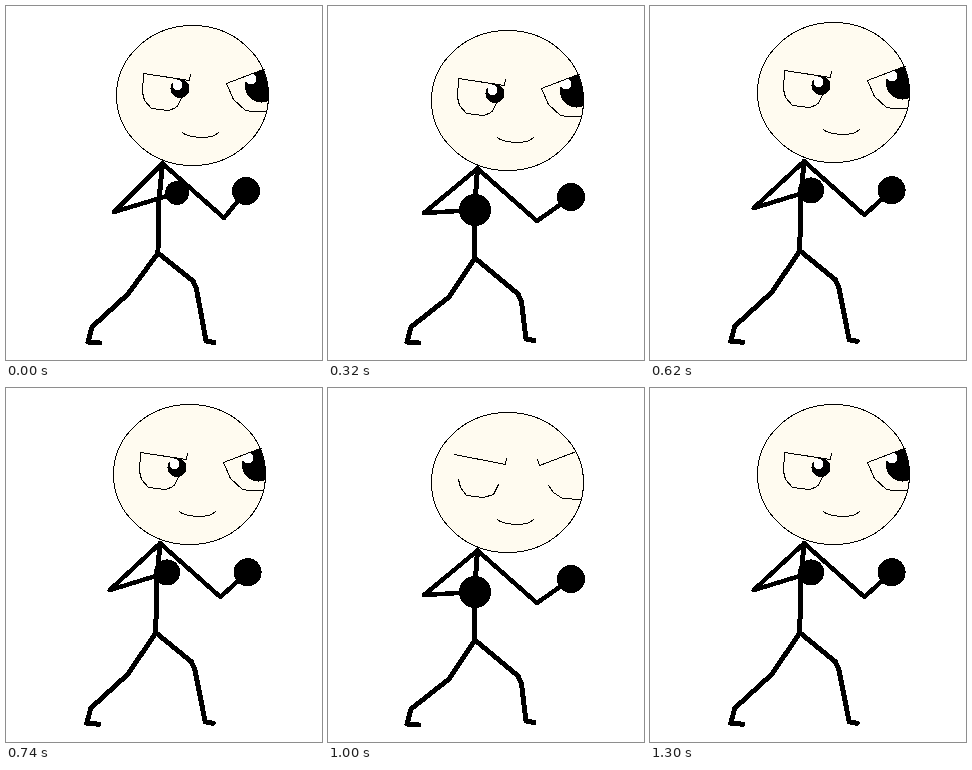
Write an HTML page that moves like this. It is 316x354 px and loops after 1360 ms.

```html
<!DOCTYPE html>
<html lang="en">
<head>
<meta charset="utf-8">
<title>Fighting stance</title>
<style>
  html, body { margin: 0; width: 100%; height: 100%; overflow: hidden; background: #fff; }
  svg { display: block; width: 316px; height: 354px; shape-rendering: crispEdges; }
  .line { fill: none; stroke: #000; stroke-width: 1; }
  .limb { fill: none; stroke: #000; stroke-width: 5; stroke-linecap: round; stroke-linejoin: round; }
  .arm { stroke-width: 4.5; }
  .skin { fill: #fffbf0; }
  .shine { fill: #fff; }
</style>
</head>
<body>
<svg viewBox="0 0 316 354">
  <defs>
    <clipPath id="leftLid"><path d="M27 48L74 55V90H20Z"/></clipPath>
    <clipPath id="rightLid"><path d="M110 58L148 43.5L160 50V95H110Z"/></clipPath>
    <clipPath id="skull"><ellipse cx="76" cy="70" rx="76" ry="70"/></clipPath>
  </defs>
  <g id="head">
    <ellipse class="line skin" cx="76.5" cy="70.5" rx="76" ry="70"/>
    <g transform="translate(.5 .5)">
      <path class="line" d="M66 107Q69 111 84 112Q98 112 102 107"/>
      <g id="open">
        <g clip-path="url(#leftLid)">
          <circle cx="63.5" cy="63" r="9.5"/>
          <circle class="shine" cx="61" cy="59.5" r="5"/>
        </g>
        <g clip-path="url(#skull)">
          <g clip-path="url(#rightLid)">
            <circle cx="145" cy="60.5" r="16.5"/>
            <circle class="shine" cx="134.5" cy="53.5" r="5.5"/>
          </g>
        </g>
        <path class="line" d="M74 49L73 55L27 48L26 67L28 75L35 83L52 85L60 82L65 73"/>
        <path class="line" d="M148 43.5L110 58L117 74L129 85L136 86H150"/>
      </g>
      <g id="shut" class="line">
        <path d="M23 42L74 52L75 46M106 47L108 53L145 39"/>
        <path d="M27 67L29 75L35 83L52 85L62 82L67 72M117 73L122 80L131 86L150 87"/>
      </g>
    </g>
  </g>
  <path id="spine" class="limb"/>
  <path id="legL" class="limb"/>
  <path id="legR" class="limb"/>
  <path id="armL" class="limb arm"/>
  <path id="armR" class="limb arm"/>
  <circle id="fistL"/>
  <circle id="fistR" r="14"/>
</svg>
<script>
const $ = id => document.getElementById(id);
const set = (id, attrs) => {
  for (const key in attrs) $(id).setAttribute(key, attrs[key]);
};
const line = (id, ...pts) => set(id, { d: 'M' + pts.join('L') });
const shift = ([x, y], dx, dy) => [x + dx, y + dy];
const mix = (a, b, k) => a.map((v, i) => v + (b[i] - v) * k);

// Three key poses: leaning back, risen, crouched.
const keys = [
  { head: [110, 19], hip: [152, 247], size: [12],
    elbowL: [108, 206], fistL: [171, 187], elbowR: [218, 212], fistR: [240, 185],
    kneeL: [122, 288], heelL: [82, 336], kneeR: [187, 275], heelR: [200, 335] },
  { head: [104, 16], hip: [147, 244], size: [14.5],
    elbowL: [97, 199], fistL: [146.5, 180.5], elbowR: [209, 207], fistR: [244, 183],
    kneeL: [121, 284], heelL: [79, 334], kneeR: [183, 272], heelR: [198, 332] },
  { head: [103, 24], hip: [147, 252], size: [16],
    elbowL: [96, 207], fistL: [147, 204], elbowR: [209, 215], fistR: [243, 191],
    kneeL: [121, 291], heelL: [79, 336], kneeR: [190, 288], heelR: [198, 333] }
];

// Position along the key poses at each step down, and how long a step holds.
const path = [0, 0.4, 0.75, 1, 1.5, 2];
const deepest = path.length - 1;
const hold = depth => 60 + 20 * Math.max(0, depth - 3);
const steps = Array.from({ length: 2 * deepest }, (_, i) => deepest - Math.abs(deepest - i));
const bounceTime = steps.reduce((sum, depth) => sum + hold(depth), 0);

function poseAt(pos) {
  const from = Math.min(1, Math.floor(pos));
  const pose = {};
  for (const joint in keys[0]) {
    pose[joint] = mix(keys[from][joint], keys[from + 1][joint], pos - from);
  }
  // The upper body hops a little between the first two poses.
  if (pos > 0 && pos < 1) {
    for (const joint of ['head', 'hip', 'elbowL', 'elbowR']) pose[joint][1] -= 1;
  }
  return pose;
}

function draw(pos, blink) {
  const p = poseAt(pos);
  const neck = shift(p.head, 46.5, 138.5);
  const chest = shift(mix(neck, p.hip, 0.5), -2, 0);
  set('head', { transform: `translate(${p.head.map(Math.floor)})` });
  $('open').style.display = blink ? 'none' : '';
  $('shut').style.display = blink ? '' : 'none';
  line('spine', neck, chest, p.hip);
  line('armL', neck, p.elbowL, p.fistL);
  line('armR', neck, p.elbowR, p.fistR);
  line('legL', p.hip, p.kneeL, shift(p.heelL, 4, -15), p.heelL, shift(p.heelL, 12, 1));
  line('legR', p.hip, p.kneeR, shift(p.kneeR, 3.5, 8), p.heelR, shift(p.heelR, 8, 1.5));
  set('fistL', { cx: p.fistL[0], cy: p.fistL[1], r: p.size[0] });
  set('fistR', { cx: p.fistR[0], cy: p.fistR[1] });
}

function tick() {
  const t = performance.now() % (bounceTime * 2);
  const secondBounce = t >= bounceTime;
  let rest = t % bounceTime, i = 0;
  while (rest >= hold(steps[i])) rest -= hold(steps[i++]);
  draw(path[steps[i]], secondBounce && steps[i] === deepest);
  requestAnimationFrame(tick);
}
tick();
</script>
</body>
</html>
```
